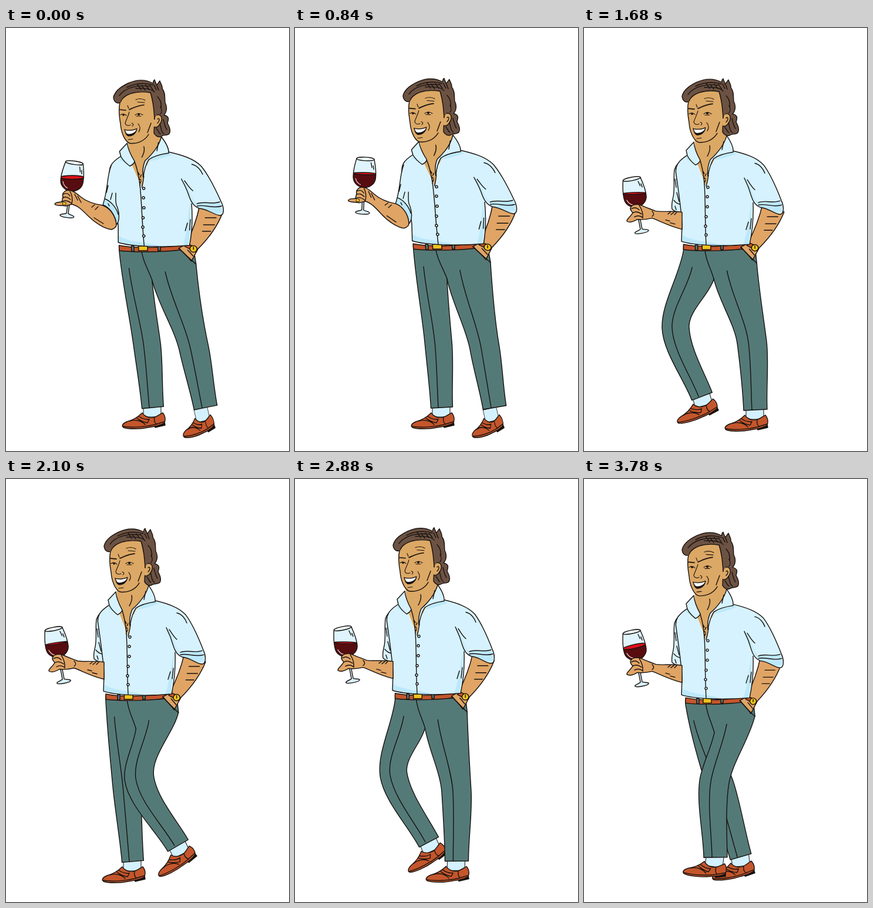
Recreate the animation shown at these times as an HTML page. Size 482 px wide and 720 px high, loop 3840 ms.

```html
<!DOCTYPE html>
<html lang="en">
<head>
<meta charset="utf-8">
<title>Strolling with a glass of wine</title>
<style>
html, body { margin: 0; width: 100%; height: 100%; overflow: hidden; background: #fff; }
svg { display: block; width: 482px; height: 720px; }
.ln { fill: none; }
.skin { fill: #dca865; }
.arm { fill: #e0a465; }
.hair { fill: #6c5243; }
.shirt { fill: #d6f2fe; }
.shade { fill: #bce8fb; stroke: none; }
.leather { fill: #c4562c; }
.gold { fill: #f3c21b; }
.cloth { fill: #547a78; }
.dark { fill: #17120f; }
</style>
</head>
<body>
<svg viewBox="0 0 482 720" stroke="#17120f" stroke-width="1.4" stroke-linecap="round" stroke-linejoin="round">
  <defs>
    <clipPath id="bowl"><path d="M-15-47C-18-35-20-24-19-14C-18-4-8 2 0 2C8 2 18-4 19-14C20-24 18-35 15-47Z"/></clipPath>
    <g id="shoe">
      <path fill="#d3f1fe" stroke-width="1" d="M-16-4L-16 16L14 16L14-4Z"/>
      <path class="dark" d="M3 32L20 25L21 30L4 34Z"/>
      <path class="leather" d="M-18 9C-15 14-8 18 0 17C7 16 12 11 17 9C21 14 22 20 20 26C12 31 4 32-8 34C-22 37-42 37-50 34C-54 31-51 27-44 24C-32 21-25 16-18 9Z"/>
      <path class="ln" d="M-51 32C-36 35-12 33 4 29L20 24M-39 23C-31 20-19 22-13 29M-24 15C-18 19-11 21-6 20L-9 26C-16 25-22 22-27 18M3 17C2 23 3 26 6 28"/>
    </g>
  </defs>

  <g id="far">
    <use href="#shoe"/>
    <path class="cloth" stroke="none"/><path class="ln"/><path class="ln"/>
  </g>
  <g id="near">
    <use href="#shoe"/>
    <path class="cloth" stroke="none"/><path class="ln"/><path class="ln"/>
  </g>

  <g id="hips">
    <path class="leather" d="M173 373C200 379 250 377 288 370L291 377C260 384 205 386 173 382Z"/>
    <path class="gold" d="M203 374H217V382H203Z"/>
    <path class="cloth" d="M192 374H196V383H192ZM233 374H237V382H233Z"/>
    <path class="arm" d="M300 306C295 330 287 350 277 371L265 378C273 386 280 394 284 400L295 379C311 362 327 340 335 318Z"/>
    <path class="ln" d="M266 378C273 387 282 396 291 405M308 326H325M305 338H322M303 349H316M279 381L287 391"/>
    <path class="leather" d="M278 370L293 377L291 384L275 375Z"/>
    <circle class="gold" cx="288" cy="379" r="5.5"/><path class="ln" d="M288 376V380"/>
  </g>

  <g id="torso">
    <path class="skin" stroke="none" d="M188 185L222 160L242 162L247 212L214 240L208 274L190 228Z"/>
    <g id="walkSleeve">
      <path class="shirt" d="M176 222C167 228 157 236 154 246C152 262 155 276 152 292C150 300 149 308 150 313C154 317 160 319 166 319L171 260Z"/>
      <path class="ln" d="M153 298C157 303 162 305 166 305M155 262L157 276M158 262L160 272M158 285L162 300M155 308L157 314"/>
    </g>
    <path class="shirt" stroke="none" d="M187 200L175 221C160 231 154 240 157 254C161 284 166 315 167 340L166 368C185 375 240 377 282 373C286 355 289 330 288 302L300 310C314 311 325 322 334 322C342 321 340 306 336 298C329 280 318 254 306 238C294 225 275 219 254 214L243 189L236 212C222 224 214 240 208 274L190 230Z"/>
    <path class="shade" d="M273 258C287 278 288 298 298 302L334 299L338 317L326 319L298 308C286 292 281 275 273 258ZM286 300C285 327 284 350 280 372L271 374C279 352 281 325 286 300ZM176 222C184 225 191 234 195 240C187 236 181 231 174 228ZM254 215C240 219 228 224 220 230C233 228 246 224 259 219ZM167 357C187 369 214 367 232 374C210 375 187 373 166 368Z"/>
    <path class="ln" d="M175 222C161 231 154 240 157 254C161 284 166 315 167 340L166 368C185 375 240 377 282 373C286 355 289 330 288 302M254 214C275 219 294 225 306 238C318 254 329 280 336 298C340 306 342 321 334 322C325 322 314 311 300 310C292 307 288 301 285 291C282 280 278 270 273 260M297 302C309 297 321 304 334 299M297 306C310 303 323 311 337 306M278 263C283 270 285 275 291 280M291 235C300 237 306 246 308 252M280 335L276 348M285 329L283 347M205 270C207 300 206 340 208 373M212 255C211 262 210 268 208 274"/>
    <path class="shirt" d="M187 199L174 213L176 222C180 230 186 235 190 238C194 236 197 234 198 230C193 221 188 211 187 199Z"/>
    <path class="shirt" d="M243 188C250 198 255 208 254 216C240 218 228 222 221 227C216 235 213 245 211 257C210 248 211 238 215 229C226 219 239 204 243 188Z"/>
    <path class="ln" d="M198 231C202 243 204 258 205 271M214 205C216 213 212 219 210 223M203 249L205 253M208 253L206 257M204 259L207 262M207 264L205 268M238 198L235 212"/>
    <g id="buttons" fill="#eefaff"></g>
  </g>

  <g id="head">
    <path class="skin" stroke="none" d="M222 150L244 160L242 190L226 188Z"/>
    <path class="hair" d="M167 121C170 108 184 101 192 97C208 90 223 91 234 97C236 95 233 94 237 91C238 95 240 97 240 100C243 98 244 95 246 93C248 99 251 102 250 106C256 114 254 122 255 130C259 137 258 146 253 151C264 154 260 160 259 165C263 172 265 178 262 183C258 187 253 184 249 187C244 190 239 187 236 182L238 130L185 121L179 130C174 132 168 130 167 121Z"/>
    <path class="skin" stroke="none" d="M178 129C175 141 176 153 179 166C180 181 186 195 194 199C205 201 219 197 227 184L236 171L244 163L237 146L231 114C214 108 190 113 178 129Z"/>
    <path class="skin" d="M237 158C236 151 243 148 248 153C252 161 244 173 237 172"/>
    <path class="hair" stroke="none" d="M229 111L240 115L242 149L237 157L235 137Z"/>
    <path class="ln" d="M178 130C175 143 177 155 179 166C180 181 186 195 194 199C205 201 219 197 227 184M225 181L231 165M230 113C234 124 236 142 237 158M179 129C184 116 204 109 230 113M242 158C245 155 247 160 242 165"/>
    <path class="ln" d="M177 118C188 103 210 100 228 102M190 104C204 97 220 96 234 100M205 106C218 105 232 106 237 112M214 108L208 99M221 109L215 101M228 108L222 100M234 108L229 101M240 108L236 100M244 109L241 101M242 120C247 125 249 132 248 139M247 137C250 143 250 146 247 149M252 159C254 167 255 172 258 176M246 166C249 176 248 180 253 183M240 174C244 178 243 181 247 183"/>
    <path class="ln" stroke-width="1.7" d="M178 142L188 143M194 142C201 139 207 135 219 134"/>
    <path class="ln" stroke-width="1.1" d="M179 151C183 148 186 149 189 152M204 151C209 147 213 148 217 151M206 153L214 153M205 125C210 123 216 123 221 126M208 129L220 130M193 140L191 135M194 146C192 154 188 160 187 165C188 169 192 170 196 168M198 165C202 166 201 169 199 170M209 166C214 172 212 177 210 180M192 193L200 192"/>
    <circle class="dark" stroke="none" cx="184" cy="151" r="1.7"/><circle class="dark" stroke="none" cx="210" cy="150" r="2"/>
    <path class="dark" stroke-width="1" d="M186 176C193 178 201 177 207 174C206 182 201 187 193 187C189 187 187 181 186 176Z"/>
    <path fill="#fff" stroke="none" d="M187 177C194 178.500 200 178 206 175.500C205 180 200 183 193 183.500C189 183.500 188 180 187 177Z"/>
  </g>

  <g id="standSleeve">
    <path class="shirt" stroke="none" d="M182 232C172 247 174 275 165 301C176 305 187 319 188 335C194 328 195 315 192 305L200 250Z"/>
    <path class="shade" d="M169 291C181 297 190 307 192 323L188 334C184 318 177 307 165 301Z"/>
    <path class="ln" d="M179 235C172 250 174 275 165 301C176 305 187 319 188 335C194 328 193 315 190 306C186 299 187 292 187 281M169 291C179 295 188 306 191 317M174 268L171 280M181 281L178 292M176 303L174 299"/>
  </g>

  <g id="glass">
    <path fill="#d9f1fb" d="M-1.500 1V40C-4 42-12 42-12 44.500C-11 48 11 48 12 44.500C12 42 4 42 1.500 40V1Z"/>
    <path fill="#dff4fd" stroke="none" d="M-15-47C-18-35-20-24-19-14C-18-4-8 2 0 2C8 2 18-4 19-14C20-24 18-35 15-47Z"/>
    <g clip-path="url(#bowl)"><g id="wine">
      <path fill="#570d10" d="M-45 0H45V60H-45Z"/>
      <ellipse fill="#dc111b" rx="20"/>
    </g></g>
    <path class="ln" d="M-15-47C-18-35-20-24-19-14C-18-4-8 2 0 2C8 2 18-4 19-14C20-24 18-35 15-47"/>
    <ellipse fill="#eefaff" cy="-47" rx="15" ry="3"/>
    <path class="ln" d="M10-41L12-33M14-36L15-30"/>
    <path class="ln" stroke="#fff" stroke-width="1" d="M-15-13C-13-7-9-4-6-3"/>
  </g>

  <g id="walkHand">
    <path class="arm" d="M167 318C150 315 135 318 122 316C112 312 104 309 97 306C90 303 82 305 80 309C77 313 81 316 83 319C79 326 72 330 73 333C78 337 86 333 91 330C99 331 108 330 116 328C130 333 145 342 167 347Z"/>
    <path class="ln" d="M81 312C86 309 91 311 94 314M83 319C88 316 94 318 98 321M86 326C91 323 96 324 100 327M94 306C99 314 101 321 100 328M143 321L147 318M148 322L153 318M154 322L158 318M147 336L155 338M139 331L146 333M116 316C120 320 119 323 116 325"/>
  </g>
  <g id="standHand">
    <path class="arm" d="M165 302C152 300 138 296 128 288C122 283 117 279 112 277L104 276C98 278 95 283 97 288C95 291 97 295 94 296C90 297 84 296 83 300C87 304 96 301 102 303L112 300C122 302 130 310 140 320C152 332 168 342 180 343C185 341 188 338 188 335C187 319 176 306 165 302Z"/>
    <path class="gold" stroke-width=".8" d="M97 296L102 297L102 301L97 301Z"/>
    <path class="ln" d="M98 283C103 280 107 283 109 286M97 289C103 286 106 289 110 292M95 296C101 292 107 295 111 298M109 278C113 285 114 291 112 299M117 283L122 293M122 286L128 297M146 305L151 301M152 309L157 304M150 323L158 328M158 328L166 333"/>
  </g>
</svg>
<script>
const $ = id => document.getElementById(id);
const LOOP = 3840, STEP = 60, WALK = 1080, PASS = 1200, STRIDE = 1320;
const TAU = Math.PI * 2;

$('buttons').innerHTML = [[211, 276], [210, 292], [210, 309], [208, 326], [207, 342], [208, 357]]
  .map(([x, y]) => `<circle cx="${x}" cy="${y}" r="2"/>`).join('');

// phase ms, knee x y, ankle x y, shoe angle
const NEAR = [
  [0, 234, 520, 223, 647, 0], [240, 260, 528, 258, 650, 0], [480, 286, 535, 292, 650, 0],
  [600, 275, 528, 305, 647, -7], [720, 252, 520, 308, 638, -20], [900, 227, 510, 293, 624, -26],
  [1080, 211, 508, 253, 630, -10], [1260, 222, 515, 224, 644, 7]];
const FAR = [
  [0, 238, 520, 276, 640, -12], [240, 196, 507, 256, 620, -27], [360, 168, 504, 228, 618, -24],
  [480, 156, 510, 201, 627, -15], [600, 170, 515, 187, 642, -3], [720, 191, 520, 188, 652, 0],
  [900, 205, 523, 216, 651, 0], [1080, 222, 525, 244, 650, 0], [1260, 233, 524, 267, 643, -6]];

const mod = (a, n) => ((a % n) + n) % n;

// Periodic cubic Hermite through the key poses
function pose(keys, phase) {
  const n = keys.length;
  const at = i => {
    const k = keys[mod(i, n)].slice();
    k[0] += Math.floor(i / n) * STRIDE;
    return k;
  };
  let i = n - 1;
  while (keys[i][0] > phase) i--;
  const [a, b, c, d] = [at(i - 1), at(i), at(i + 1), at(i + 2)];
  const span = c[0] - b[0], u = (phase - b[0]) / span;
  return b.slice(1).map((v, j) => {
    const k = j + 1;
    const m0 = (c[k] - a[k]) / (c[0] - a[0]) * span;
    const m1 = (d[k] - b[k]) / (d[0] - b[0]) * span;
    const e = c[k] - v;
    return v + u * (m0 + u * (3 * e - 2 * m0 - m1 + u * (m0 + m1 - 2 * e)));
  });
}

const add = (p, q, k = 1) => [p[0] + q[0] * k, p[1] + q[1] * k];
const dist = (p, q) => Math.hypot(q[0] - p[0], q[1] - p[1]);
const unit = (p, q) => [(q[0] - p[0]) / dist(p, q), (q[1] - p[1]) / dist(p, q)];
const txt = p => p.map(v => v.toFixed(1)).join(' ');
const curve = (...ps) => 'C' + ps.map(txt).join(' ');

// One trouser edge from hip to hem, or back up when rev is set
function edge(top, knee, hem, d, u, rev) {
  const l1 = dist(top, knee), l2 = dist(knee, hem);
  const c1 = add(add(top, unit(top, knee), l1 * .2), [0, 1], l1 * .12);
  const c2 = add(knee, d, -l1 * .3), c3 = add(knee, d, l2 * .3), c4 = add(hem, u, -l2 * .3);
  return rev ? curve(c4, c3, knee) + curve(c2, c1, top) : curve(c1, c2, knee) + curve(c3, c4, hem);
}

function leg(id, m, near, [kx, ky, ax, ay, ang], shoe) {
  const T = ([x, y]) => [m[0] * x + m[2] * y + m[4], y + m[5]];
  const K = [kx, ky], A = [ax, ay];
  const hip = T(near ? [260, 420] : [195, 420]);
  const d = unit(hip, A), u = unit(K, A);
  const side = (p, v, w) => [p[0] + v[1] * w, p[1] - v[0] * w];
  const kw = near ? 25 : 23, hw = near ? 20 : 18.5;
  const kl = side(K, d, -kw), kr = side(K, d, kw), hl = side(A, u, -hw), hr = side(A, u, hw);
  const lt = T(near ? [222, 432] : [173, 384]), rt = T(near ? [291, 404] : [222, 432]);
  const ends = (near ? [[207, 377], [288, 376]] : [[173, 376], [250, 376]]).map(T);
  const start = near ? txt(ends[0]) + curve(T([208, 398]), T([216, 412]), lt) : txt(ends[0]) + 'L' + txt(lt);
  const body = 'M' + start + edge(lt, kl, hl, d, u) + 'L' + txt(hr) + edge(rt, kr, hr, d, u, true);
  const [fill, line, crease] = $(id).querySelectorAll('path');
  fill.setAttribute('d', body + 'L' + txt(ends[1]) + 'Z');
  line.setAttribute('d', body + (near ? 'L' + txt(ends[1]) : ''));
  const off = [-6, 0], top = T(near ? [243, 418] : [187, 412]);
  crease.setAttribute('d', 'M' + txt(top) + edge(top, add(K, off), add(A, off), d, u));
  $(id).querySelector('use').setAttribute('transform', `translate(${ax} ${ay}) rotate(${ang}) ${shoe || ''}`);
}

const move = (id, s) => $(id).setAttribute('transform', s);
const show = (id, on) => $(id).setAttribute('display', on ? 'inline' : 'none');

// Matrix m widened by k around the base line x = c
const widen = (m, k, c) => [m[0] + k, m[1], m[2], m[3], m[4] - k * c, m[5]];

function draw(t) {
  const walking = t >= WALK;
  for (const id of ['walkSleeve', 'walkHand']) show(id, walking);
  for (const id of ['standSleeve', 'standHand']) show(id, !walking);
  let m, hips, gx, gy, tilt, slosh, open;

  if (walking) {
    const w = t - PASS, phase = mod(w, STRIDE);
    const bob = -4.2 + 4.2 * Math.cos(TAU * w / 660);
    const apart = (1 - Math.cos(TAU * w / STRIDE)) / 2;
    const settle = Math.exp(-(t - WALK) / 150);
    const wave = Math.cos(TAU * (w - 70) / 660);
    m = [1, 0, 0, 1, 0, bob];
    hips = widen(m, .07 * apart, 235);
    leg('far', hips, false, pose(FAR, phase));
    leg('near', hips, true, pose(NEAR, phase));
    move('head', `translate(0 ${bob})`);
    move('walkHand', `translate(0 ${bob * .9})`);
    gx = 90;
    gy = 307 + bob * .8 - 5 * settle;
    tilt = -11 + 12 * settle;
    slosh = -9 - 11 * wave - 28 * settle;
    open = 1.5 + 5.5 * Math.max(0, wave) + 7 * settle;
  } else {
    const s = .57 * (1 - Math.cos(TAU * t / 1140));
    m = [1.045, 0, .04 + .037 * s, 1, 3 + .2 * s, -3 - 4.5 * s];
    hips = widen(m, .055, 285);
    leg('far', hips, false, [240 + 7 * s, 537, 250, 646, 0]);
    leg('near', hips, true, [320 + 5 * s, 545, 340, 646, -13], 'translate(-8 4) scale(.77 1.1)');
    move('head', `translate(${16 + 1.5 * s} ${-3 - 4 * s})`);
    move('standSleeve', `translate(${10 * s} ${-3 * s})`);
    move('standHand', `translate(${10 * s} ${-3 * s}) rotate(${4 * s} 185 330)`);
    gx = 110 + 12 * s;
    gy = 276 - 10 * s;
    tilt = 8 - 8 * s;
    slosh = 7 * Math.sin(TAU * t / 1800);
    open = 1 + 2.2 * Math.max(0, 1 - s);
  }
  move('torso', `matrix(${m})`);
  move('hips', `matrix(${hips})`);
  move('glass', `translate(${gx} ${gy}) rotate(${tilt})`);
  move('wine', `translate(0 -22) rotate(${slosh - tilt})`);
  $('wine').querySelector('ellipse').setAttribute('ry', open);
}

function tick() {
  draw(Math.floor(performance.now() % LOOP / STEP) * STEP);
  requestAnimationFrame(tick);
}
tick();
</script>
</body>
</html>
```
